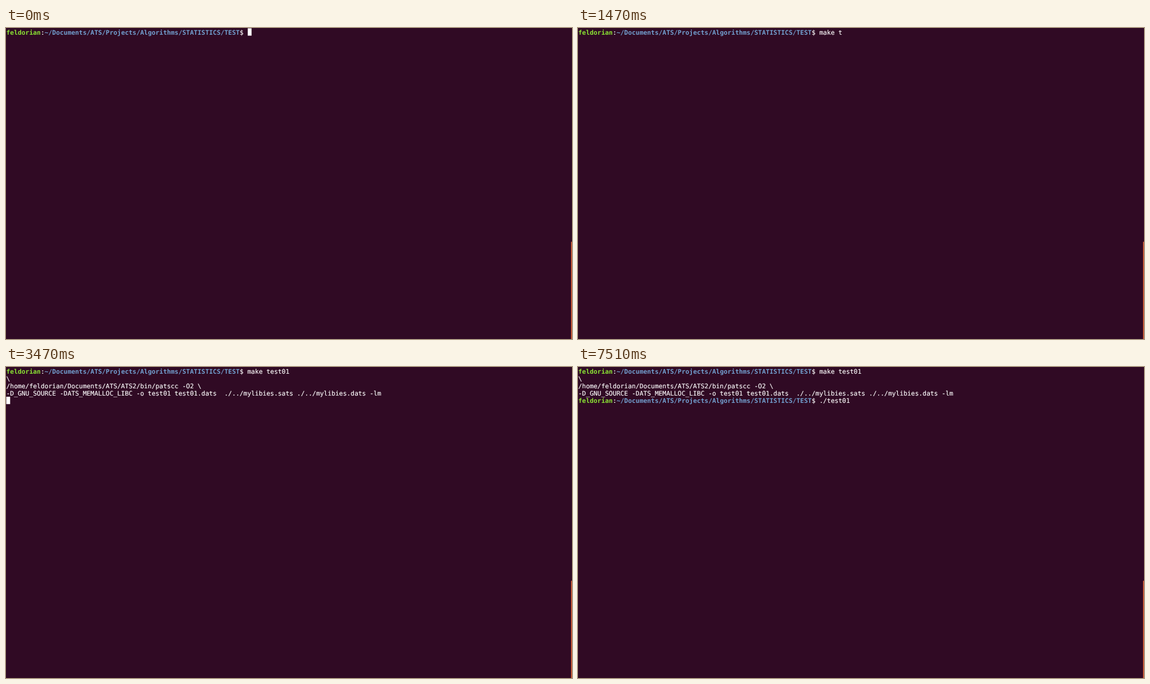
Recreate the animation shown at these times as an HTML page. Size 1009 by 555 pixels, loop 8 s.

```html
<!DOCTYPE html>
<html lang="en">
<head>
<meta charset="utf-8">
<title>Terminal</title>
<style>
  html, body { margin: 0; width: 100%; height: 100%; overflow: hidden; background: #300a24; }
  svg { display: block; width: 1009px; height: 555px; }
  text {
    font: 11.347px "DejaVu Sans Mono", monospace;
    fill: #fff;
    stroke: #fff;
    stroke-width: 0.15px;
    white-space: pre;
    text-rendering: geometricPrecision;
  }
  .user, .path { font-weight: bold; stroke: none; }
  .user { fill: #8ae234; }
  .path { fill: #729fcf; }
</style>
</head>
<body>
<svg viewBox="0 0 1009 555">
  <rect width="1009" height="555" fill="#300a24"/>
  <rect x="1007.5" y="381.5" width="1.5" height="173.5" fill="#eb6f3c"/>
  <g id="screen"></g>
  <rect id="cursor" fill="#fff"/>
</svg>
<script>
// a 1920 px wide terminal with 13 x 25 px cells, scaled to the stage
const SCALE = 1009 / 1920;
const CELL = 13 * SCALE, ROW = 25 * SCALE, PAD = SCALE, BASE = 22 * SCALE;
const LOOP = 8000;
const USER = 'feldorian';
const PATH = '~/Documents/ATS/Projects/Algorithms/STATISTICS/TEST';
const PROMPT_LEN = USER.length + PATH.length + 3;
const OUTPUT = [
  '\\',
  `/home/${USER}/Documents/ATS/ATS2/bin/patscc -O2 \\`,
  '-D_GNU_SOURCE -DATS_MEMALLOC_LIBC -o test01 test01.dats  ./../mylibies.sats ./../mylibies.dats -lm'
];
const BUILD = 'make test01', RUN = './test01';

// start time, phase, typed characters, cursor shown
const STEPS = [
  [0, 'build', 0, true],
  [760, 'build', 1, true],
  [840, 'build', 2, true],
  [1000, 'build', 3, true],
  [1090, 'build', 4, true],
  [1220, 'build', 5, false],
  [1470, 'build', 6, false],
  [1570, 'build', 7, false],
  [1750, 'build', 9, false],
  [2590, 'build', 10, false],
  [2720, 'build', 11, false],
  [3370, 'enter', 11, true],
  [3470, 'output', 11, true],
  [5850, 'run', 0, true],
  [6680, 'run', 1, true],
  [6880, 'run', 2, true],
  [7160, 'run', 3, true],
  [7250, 'run', 4, false],
  [7510, 'run', 8, false]
];

const NS = 'http://www.w3.org/2000/svg';
const screen = document.getElementById('screen');
const cursor = document.getElementById('cursor');
cursor.setAttribute('width', CELL);
cursor.setAttribute('height', ROW);

function add(parent, tag, text = '', cls = '') {
  const el = document.createElementNS(NS, tag);
  el.textContent = text;
  if (cls) el.setAttribute('class', cls);
  return parent.appendChild(el);
}

function addLine(row, text = '') {
  const line = add(screen, 'text', text);
  line.setAttribute('x', PAD);
  line.setAttribute('y', BASE + row * ROW);
  return line;
}

function addPrompt(row) {
  const line = addLine(row);
  add(line, 'tspan', USER, 'user');
  add(line, 'tspan', ':');
  add(line, 'tspan', PATH, 'path');
  add(line, 'tspan', '$ ');
  return { line, input: add(line, 'tspan') };
}

const first = addPrompt(0);
const output = OUTPUT.map((text, i) => addLine(i + 1, text));
const second = addPrompt(4);

function show(el, on) {
  el.setAttribute('visibility', on ? 'visible' : 'hidden');
}

function draw([, phase, typed, cursorOn]) {
  const running = phase === 'run';
  first.input.textContent = phase === 'build' ? BUILD.slice(0, typed) : BUILD;
  second.input.textContent = running ? RUN.slice(0, typed) : '';
  output.forEach(line => show(line, running || phase === 'output'));
  show(second.line, running);

  const row = { build: 0, enter: 1, output: 4, run: 4 }[phase];
  const col = running || phase === 'build' ? PROMPT_LEN + typed : 0;
  cursor.setAttribute('x', PAD + col * CELL);
  cursor.setAttribute('y', PAD + row * ROW);
  show(cursor, cursorOn);
}

const start = performance.now();
let current;

function tick() {
  const time = (performance.now() - start) % LOOP;
  const step = STEPS.findLast(s => s[0] <= time);
  if (step !== current) draw(current = step);
  requestAnimationFrame(tick);
}
tick();
</script>
</body>
</html>
```
